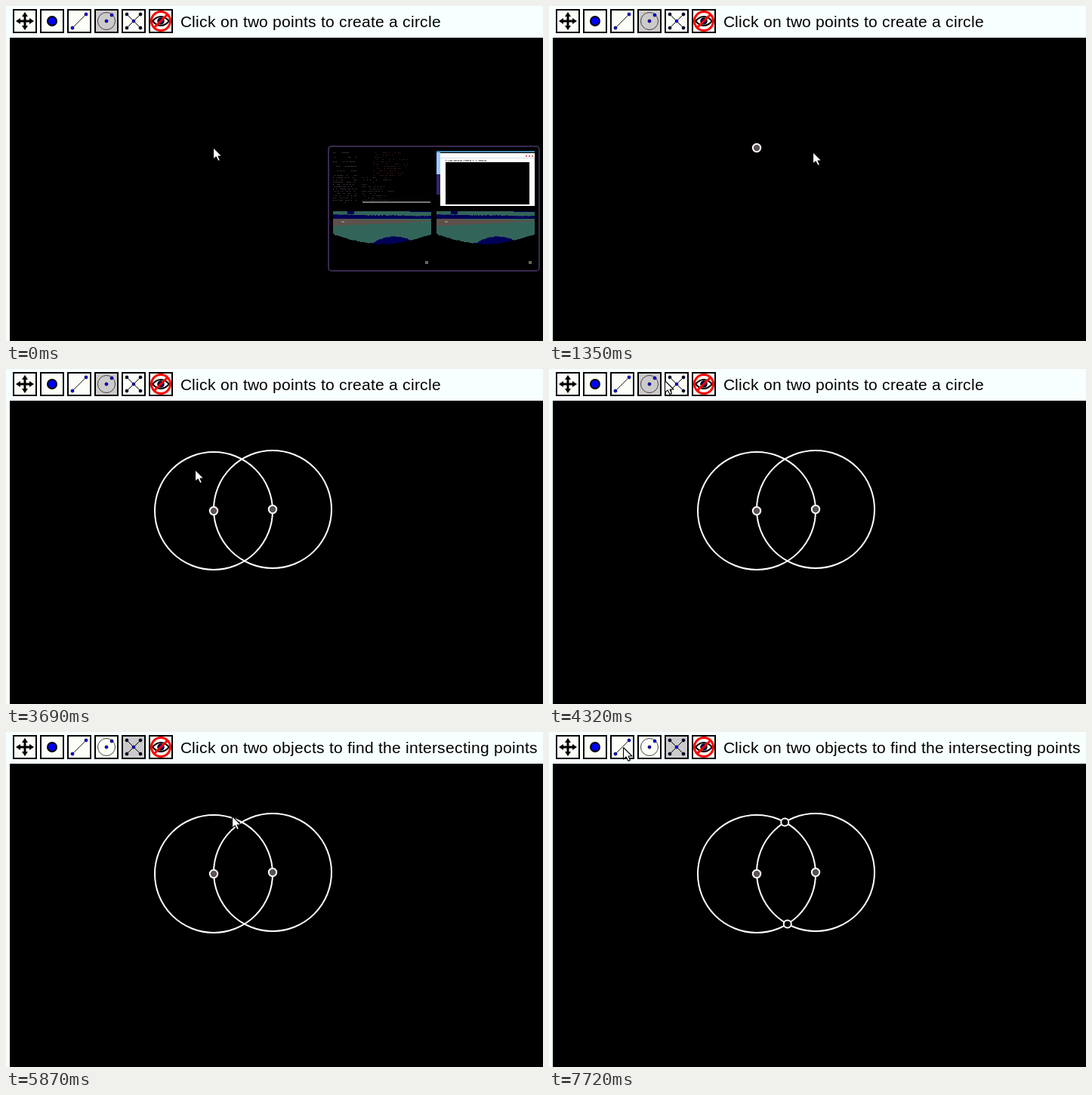
Recreate the animation shown at these times as an HTML page with a canvas. Size 711x444 px, loop 8 s.

```html
<!DOCTYPE html>
<html lang="en">
<head>
<meta charset="utf-8">
<title>Circle construction</title>
<style>
  html, body { margin: 0; width: 100%; height: 100%; overflow: hidden; background: #f8ffff; }
  canvas { display: block; }
</style>
</head>
<body>
<canvas id="stage" width="711" height="444"></canvas>
<script>
const ctx = document.getElementById('stage').getContext('2d');
const LOOP = 8000;
const PAPER = '#f8ffff', GLOW = '#38294f', BLUE = '#0000ff', NAVY = '#000058';
const A = [275, 188], B = [353, 186], RADIUS = 78;

// Pointer gestures: start, end, destination
const MOVES = [
  [1180, 1350, [350, 194]], [1350, 1745, [352, 186]],
  [2420, 2730, [239, 184]], [2730, 3150, A],
  [3690, 3690, [251, 134]], [3690, 4150, [142, 18]], [4150, 4500, [167, 13]],
  [4780, 4780, [301, 100]], [5010, 5010, [296, 115]], [5240, 5460, [294, 112]],
  [5690, 6400, [328, 114]],
  [6700, 7180, [126, 24]], [7360, 7720, [99, 21]]
];

const smooth = p => p * p * (3 - 2 * p);
const during = (t, from, to) => t >= from && t < to;

function pointerAt(t) {
  let [x, y] = A;
  for (const [from, to, [toX, toY]] of MOVES) {
    if (t < from) break;
    const p = t >= to ? 1 : smooth((t - from) / (to - from));
    x += (toX - x) * p;
    y += (toY - y) * p;
  }
  return [Math.round(x), Math.round(y)];
}

function seeded(seed) {
  return () => (seed = (seed * 16807) % 2147483647) / 2147483647;
}

function rect(color, x, y, w, h) {
  ctx.fillStyle = color;
  ctx.fillRect(x, y, w, h);
}

function paint(fill, stroke, width = 1) {
  if (fill) {
    ctx.fillStyle = fill;
    ctx.fill();
  }
  if (stroke) {
    ctx.strokeStyle = stroke;
    ctx.lineWidth = width;
    ctx.stroke();
  }
}

function shape(points, ...style) {
  ctx.beginPath();
  points.forEach(([x, y]) => ctx.lineTo(x, y));
  paint(...style);
}

function disc([x, y], r, ...style) {
  ctx.beginPath();
  ctx.arc(x, y, r, 0, Math.PI * 2);
  paint(...style);
}

function smallDot(x, y, color = BLUE) {
  disc([x, y], 2, color, '#000040', 0.8);
}

// Each icon is drawn around its button centre
const ICONS = [
  () => {
    for (let i = 0; i < 4; i++) {
      ctx.rotate(Math.PI / 2);
      shape([[0, 0], [0, -8]], null, '#000', 3);
      shape([[0, -12], [4, -6], [-4, -6]], '#000');
    }
  },
  () => disc([0, 0], 6, BLUE, '#000', 2),
  () => {
    shape([[-9, 9], [9, -9]], null, '#222');
    smallDot(-9, 9);
    smallDot(9, -9);
  },
  () => {
    disc([0, 0], 11.5, null, '#444');
    smallDot(0, 0);
    smallDot(7, -8);
  },
  () => {
    for (const x of [-9, 9]) {
      shape([[x, -9], [-x, 9]], null, '#000');
      for (const y of [-9, 9]) smallDot(x, y, '#000');
    }
    smallDot(0, 0);
  },
  () => {
    ctx.beginPath();
    ctx.moveTo(-11, 0);
    ctx.quadraticCurveTo(0, -12, 11, 0);
    ctx.quadraticCurveTo(0, 12, -11, 0);
    paint(null, '#000', 2);
    disc([0, 0], 4, '#000080', '#000', 1.5);
    disc([0, 0], 12.5, null, '#f00', 3);
    shape([[-9, 9], [9, -9]], null, '#f00', 3);
  }
];

// Glyphs advance by whole pixels
function drawText(text, x, y) {
  ctx.fillStyle = '#000';
  ctx.font = '21px "Liberation Sans", Arial, sans-serif';
  for (const glyph of text) {
    ctx.fillText(glyph, x, y);
    x += Math.round(ctx.measureText(glyph).width);
  }
}

function drawToolbar(active, hint) {
  ICONS.forEach((icon, i) => {
    const x = 9 + i * 36;
    rect('#000', x, 4, 32, 32);
    rect(i === active ? '#cccaca' : '#fcfff8', x + 2, 6, 28, 28);
    ctx.save();
    ctx.translate(x + 16, 20);
    icon();
    ctx.restore();
  });
  drawText(hint, 231, 28);
}

function drawTerminal() {
  const rand = seeded(71);
  const dashes = (x, y, w, color) => {
    for (let i = 0; i < w; i += 2) if (rand() < 0.45) rect(color, x + i, y, 1, 1);
  };
  for (let row = 0; row < 23; row++) {
    const y = 194 + row * 3, top = row < 11;
    if (!top || row % 2 === 0) dashes(433, y, 32, '#5b4b5b');
    dashes(top ? 487 : 472, y, 15 + rand() * 32, top ? '#4b2525' : '#404850');
  }
  rect('#777', 472, 259, 90, 2);
}

function drawBrowser() {
  const rand = seeded(5);
  rect('#9cc9ff', 570, 194, 5, 29);
  rect('#30256b', 570, 223, 5, 27);
  rect('#4387b2', 570, 192, 130, 2);
  rect('#fff', 575, 195, 125, 70);
  rect('#d6dce2', 575, 201, 125, 1);
  rect('#000', 582, 207, 111, 56);
  for (let x = 582; x < 636; x++) if (rand() < 0.6) rect('#333', x, 204 + (x % 2), 1, 1);
  for (let i = 0; i < 3; i++) rect('#e06068', 688 + i * 4, 198, 2, 2);
}

function drawLandscape(left) {
  const rand = seeded(19);
  for (let i = 0; i < 130; i++) {
    const x = left + i, u = i / 130;
    const column = (color, from, to) => rect(color, x, 272 + Math.round(from), 1, Math.max(0, Math.round(to) - Math.round(from)));
    const shore = 30 + 13 * Math.sin(Math.PI * u) + rand();
    const hill = 43 - 10 * Math.sin(Math.PI * (u - 0.37) / 0.5) + rand();
    column('#33645a', 0, shore);
    column(NAVY, 4 + 2 * u + rand(), 10);
    column('#5e504b', 10 + 2 * u, 19 - 6 * u + rand());
    if (during(u, 0.37, 0.87)) column(NAVY, hill, shore);
    if (during(u, 0.14, 0.21) || u > 0.78) column(NAVY, 0, u < 0.5 ? 4 : 1);
  }
  rect('#8a8175', left + 11, 285, 4, 2);
  rect('#665', left + 122, 338, 4, 4);
}

function drawSwitcher(alpha) {
  ctx.globalAlpha = alpha;
  ctx.beginPath();
  ctx.roundRect(427, 186, 279, 165, 4);
  paint(null, GLOW, 2);
  drawTerminal();
  drawBrowser();
  drawLandscape(433);
  drawLandscape(570);
  ctx.globalAlpha = 1;
}

function drawConstruction(t) {
  const circles = [
    { centre: A, shown: t >= 1790, glow: during(t, 5010, 5100) || during(t, 5290, 5780) },
    { centre: B, shown: t >= 3240, glow: during(t, 6040, 6760) }
  ].filter(c => c.shown);
  circles.filter(c => c.glow).forEach(c => disc(c.centre, RADIUS, null, GLOW, 8));
  circles.forEach(c => disc(c.centre, RADIUS, null, '#fff', 2));

  if (t >= 1000) disc(A, 5.2, '#5e5252', '#fff', 2);
  if (t >= 1790) disc(B, 5.2, '#555252', '#fff', 2);
  if (t >= 6400) drawIntersections();
}

// Equal radii: both points lie on the perpendicular bisector of AB
function drawIntersections() {
  const dx = B[0] - A[0], dy = B[1] - A[1], gap = Math.hypot(dx, dy);
  const reach = Math.sqrt(RADIUS ** 2 - gap ** 2 / 4) / gap;
  for (const side of [-1, 1]) {
    const x = A[0] + dx / 2 - side * dy * reach;
    const y = A[1] + dy / 2 + side * dx * reach;
    disc([x, y], 5, '#000', '#fff', 2);
  }
}

function drawPointer([x, y]) {
  ctx.save();
  ctx.translate(x + 0.5, y + 0.5);
  ctx.lineJoin = 'round';
  shape([[-1, -1], [-1, 14.5], [2.7, 11.5], [5.5, 17], [8, 16], [5.6, 10.5], [10.5, 10.5], [-1, -1]], '#fff', '#000', 1.1);
  ctx.restore();
}

function draw(t) {
  rect(PAPER, 0, 0, 711, 444);
  rect('#000', 5, 42, 706, 402);
  if (t < 4690) drawToolbar(3, 'Click on two points to create a circle');
  else drawToolbar(4, 'Click on two objects to find the intersecting points');
  if (t < 180) drawSwitcher(t < 90 ? 1 : 0.5);
  drawConstruction(t);
  drawPointer(pointerAt(t));
}

const start = performance.now();
function tick() {
  draw((performance.now() - start) % LOOP);
  requestAnimationFrame(tick);
}
tick();
</script>
</body>
</html>
```
